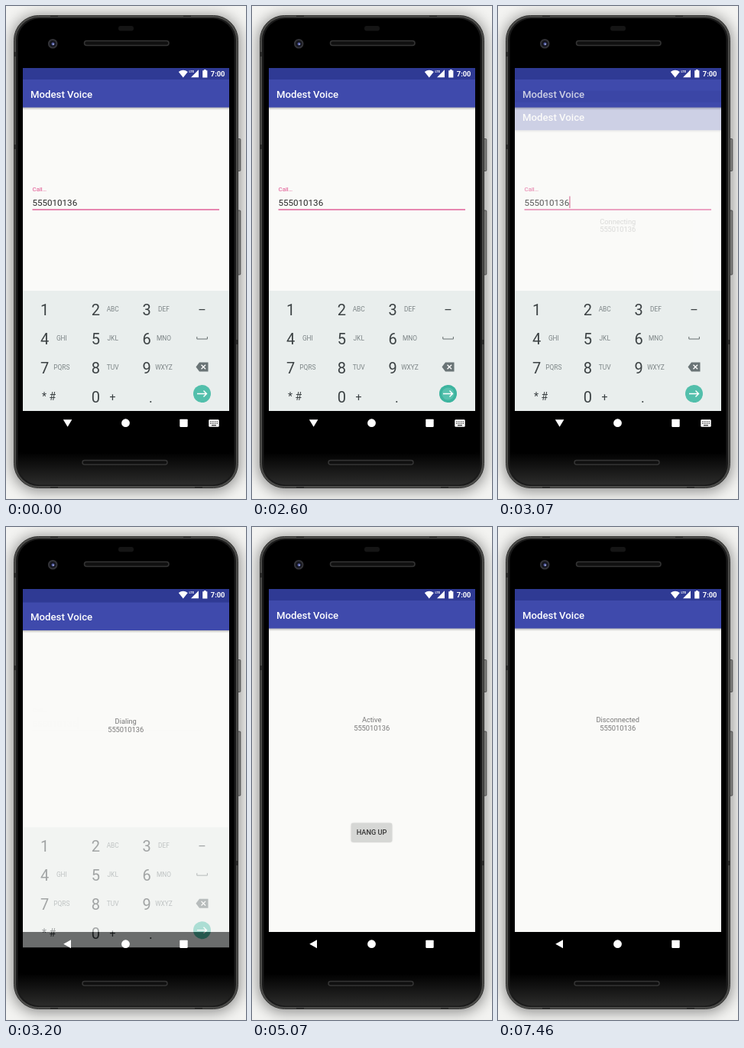
An HTML page for the animation above (8 s loop, 314 by 644 pixels).

```html
<!DOCTYPE html>
<html lang="en">
<head>
<meta charset="utf-8">
<title>Phone call</title>
<style>
  html, body { margin: 0; width: 100%; height: 100%; overflow: hidden; background: #f3f3f1; }
  svg { display: block; width: 314px; height: 644px; font-family: Roboto, sans-serif; }
  .mid { text-anchor: middle; }
</style>
</head>
<body>
<svg viewBox="0 0 314 644">
  <defs>
    <filter id="soft" x="-20%" y="-20%" width="140%" height="140%"><feGaussianBlur stdDeviation="9"/></filter>
    <filter id="blur" x="-20%" y="-40%" width="140%" height="180%"><feGaussianBlur stdDeviation="1"/></filter>
    <linearGradient id="face" x2="0" y2="1">
      <stop offset=".93"/><stop offset="1" stop-color="#2c2c2b"/>
    </linearGradient>
    <linearGradient id="drop" x2="0" y2="1">
      <stop offset="0" stop-opacity=".28"/><stop offset="1" stop-opacity="0"/>
    </linearGradient>
    <clipPath id="screen"><path d="M22 81h270v504H22z"/></clipPath>
    <clipPath id="window"><path d="M22 81h270v448H22z"/></clipPath>
    <g id="app">
      <path d="M22 120h270v409H22z" fill="#fafaf8"/>
      <path d="M22 132h270v4H22z" fill="url(#drop)"/>
      <path d="M22 81h270v16H22z" fill="#2f3a94"/>
      <path d="M22 96h270v36.5H22z" fill="#3f4aac"/>
      <text x="32" y="120" font-size="13.2" font-weight="500" fill="#fff">Modest Voice</text>
    </g>
  </defs>

  <!-- device -->
  <rect x="8" y="12" width="298" height="622" rx="34" opacity=".42" filter="url(#soft)"/>
  <g fill="#7d7d7b" stroke="#3c3c3b" stroke-width=".8">
    <rect x="303" y="173.500" width="3.800" height="42" rx="1"/>
    <rect x="303" y="267" width="3.800" height="84" rx="1"/>
  </g>
  <rect x="10.500" y="12.500" width="293" height="617" rx="32" fill="#4c4c4a" stroke="#343433"/>
  <rect x="13" y="15" width="288" height="612" rx="29.500" fill="#1a1a1a"/>
  <rect x="15.500" y="16.500" width="283" height="609" rx="28" fill="url(#face)"/>
  <path d="M10 60h3v6h-3zM10 181h3v6h-3zM301 436h3v6h-3zM58 12h10v2H58zM232 12h10v2h-10zM58 628h10v2H58zM247 628h10v2h-10z" fill="#2b2b2a"/>
  <rect x="147" y="26" width="20" height="6.500" rx="3" fill="#151515"/>
  <g fill="#101010" stroke="#343434" stroke-width="1.500">
    <rect x="102.500" y="45.500" width="110.500" height="6" rx="3"/>
    <rect x="100" y="593.500" width="111" height="5.500" rx="2.700"/>
  </g>
  <circle cx="61.200" cy="49.200" r="5.300" fill="#15161d" stroke="#333338" stroke-width="2"/>
  <circle cx="61.500" cy="49.500" r="2" fill="#4b5499"/>
  <circle cx="62" cy="50" r=".9" fill="#a9b2dd"/>

  <path d="M22 81h270v504H22z"/>
  <g clip-path="url(#window)">
    <g id="form">
      <use href="#app"/>
      <text x="34.500" y="242" font-size="7.900" fill="#e0528e">Call…</text>
      <text x="34.500" y="260.800" font-size="11.600" fill="#282828" class="number"></text>
      <path d="M34.500 266h244.500" stroke="#e0609a" stroke-width="1.400"/>
      <path id="cursor" d="M93.900 248.500v15.500" stroke="#cf4f7f" stroke-width="1.200"/>
    </g>
    <g id="call">
      <use href="#app"/>
      <g class="mid" font-size="9.300" fill="#777">
        <text id="state" x="156.700" y="255"></text>
        <text x="156.700" y="265.600" class="number"></text>
      </g>
      <g id="hang">
        <rect id="shade" x="130.500" y="388" width="52" height="23.500" rx="1.500" filter="url(#blur)"/>
        <rect x="130" y="387" width="53" height="24.300" rx="1.400" fill="#d6d7d5"/>
        <circle id="touch" cx="150.500" cy="393" r="7.500" fill="#c6c7c5"/>
        <text x="156.500" y="402.200" class="mid" font-size="9.200" font-weight="500" fill="#333">HANG UP</text>
      </g>
    </g>
  </g>
  <g clip-path="url(#screen)">
    <g id="board">
      <path d="M22 372h270v157H22z" fill="#e9eeed"/>
      <g id="keys" class="mid" fill="#3c4244"></g>
      <path d="M249.800 432v3h13.600v-3" fill="none" stroke="#666e70"/>
      <path d="M248.500 471.500l4.500-6h11.500v12H253z" fill="#6a7476"/>
      <path d="M255.500 468.700l5.600 5.600m0-5.600l-5.600 5.600" stroke="#fff" stroke-width="1.300"/>
      <circle cx="256.500" cy="506.500" r="11.500" fill="#52bfab"/>
      <g id="ripple">
        <circle cx="256.500" cy="506.500" r="11.500" fill="#1fa58f"/>
        <circle cx="256.500" cy="506.500" r="8" fill="#60c4b3"/>
      </g>
      <path d="M250 506.500h12.500m-4-4l4 4l-4 4" fill="none" stroke="#fff" stroke-width="1.400"/>
    </g>
  </g>

  <!-- system bars -->
  <g fill="#fff">
    <path d="M225.800 86Q231.800 81.400 237.800 86L231.800 93.400z"/>
    <path d="M252 83.200v10H242z"/>
    <text x="239.500" y="87" font-size="4" font-weight="700">LTE</text>
    <path d="M257.200 84.200h1.700v-1.200h2.700v1.200h1.800v9.200h-6.200z"/>
    <text x="267.800" y="92" font-size="9.300" font-weight="700">7:00</text>
    <circle cx="156.500" cy="544.700" r="5.400"/>
    <rect x="227.300" y="539.700" width="10.400" height="10.200" rx=".8"/>
    <path id="back" d="M85 539.200v11l-9.800-5.500z"/>
    <g id="down">
      <path d="M74.800 540.300h11.600l-5.800 9.400z"/>
      <rect x="265.300" y="540.300" width="13.400" height="9.400" rx="1.200"/>
      <path d="M267 543h10m-10 2.300h10" stroke="#000" stroke-width="1.100" stroke-dasharray="1.200 1"/>
      <path d="M269 547.800h6" stroke="#000"/>
    </g>
  </g>
</svg>
<script>
const LOOP = 8000;
const $ = id => document.getElementById(id);
const clamp = v => Math.min(1, Math.max(0, v));
const show = (id, on) => { $(id).style.display = on ? '' : 'none'; };
const pose = (id, dy, alpha) => {
  $(id).setAttribute('transform', `translate(0 ${dy.toFixed(2)})`);
  $(id).setAttribute('opacity', alpha);
};

document.querySelectorAll('.number').forEach(n => n.textContent = '555010136');

// keypad: columns 67 px apart, rows 38 px apart
const key = (s, x, y, size, fill = '') =>
  `<text x="${x}" y="${y}" font-size="${size}" ${fill && `fill="${fill}"`}>${s}</text>`;
const letters = ['', 'ABC', 'DEF', 'GHI', 'JKL', 'MNO', 'PQRS', 'TUV', 'WXYZ'];
$('keys').innerHTML = letters.map((s, i) => {
  const x = 50.5 + i % 3 * 66.8, y = 404 + 38 * Math.floor(i / 3);
  return key(i + 1, x, y, 20) + key(s, x + 22.4, y - 5, 8.4, '#7c8486');
}).join('') + key('* #', 56, 515, 14) + key('0', 117.3, 518, 20) +
  key('+', 139.5, 515.5, 14) + key('.', 189.3, 518, 18) + key('–', 256.5, 402.5, 16);

const step = t => t < 2870 || t > 3400 ? t : 2870 + Math.floor((t - 2863) / 66.67) * 66.67;

function draw(t) {
  const cursorOn = [130, 600, 1130, 1600, 2130, 2600, 2870].filter(c => t >= c).length % 2;
  show('cursor', cursorOn);
  const now = step(t);
  $('ripple').setAttribute('opacity',
    t < 2600 ? 0 : t < 2730 ? .4 : clamp(1 - (now - 2800) / 200));

  const rise = clamp((now - 3057) / 350);
  const fade = clamp((now - 3057) / 200);
  pose('call', 36 * (1 - rise) ** 5, 1 - (1 - fade) ** 4);
  const sink = clamp((now - 3110) / 150);
  pose('board', 52 * sink ** 2, 1 - sink ** 1.3);
  show('down', t < 3130);
  show('back', t >= 3130);

  $('state').textContent =
    t < 3130 ? 'Connecting' : t < 5070 ? 'Dialing' : t < 7460 ? 'Active' : 'Disconnected';
  show('hang', t >= 5070 && t < 7460);
  show('touch', t >= 6860 && t < 7330);
  const lift = t < 7000 || t >= 7330 ? 0 : t < 7060 ? 1 : 2;
  $('shade').setAttribute('y', 387.5 + lift);
  $('shade').setAttribute('opacity', .4 - lift * .03);
}

const start = performance.now();
function frame() {
  draw((performance.now() - start) % LOOP);
  requestAnimationFrame(frame);
}
frame();
</script>
</body>
</html>
```
